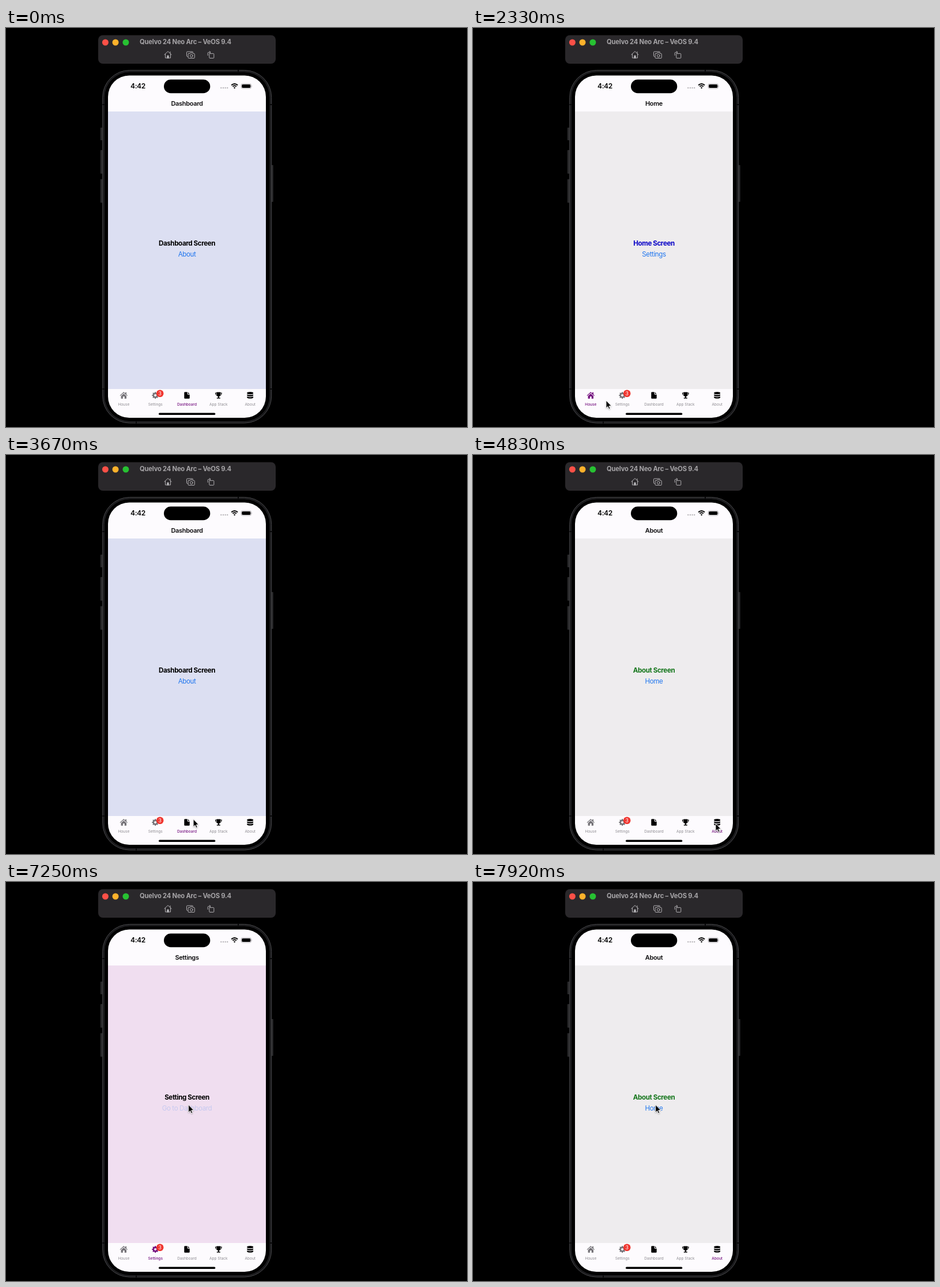
Recreate the animation shown at these times as an HTML page. Size 800 by 693 pixels, loop 8000 ms.

```html
<!DOCTYPE html>
<html lang="en">
<head>
<meta charset="utf-8">
<title>Tab navigation</title>
<style>
  html, body { margin: 0; width: 100%; height: 100%; overflow: hidden; background: #000; }
  svg { display: block; width: 800px; height: 693px; }
  text { font-family: Inter, "Open Sans", sans-serif; }
  .mid { text-anchor: middle; }
  .head { font-size: 11px; font-weight: 600; letter-spacing: -.03em; fill: #0b0a0c; }
  .name { font-size: 11.6px; font-weight: 700; letter-spacing: -.034em; }
  .link { font-size: 11.6px; letter-spacing: -.034em; fill: #2076ee; }
  .label { font-size: 6.5px; }
  .tool { fill: none; stroke: #b3b1b4; stroke-width: 1; stroke-linejoin: round; stroke-linecap: round; }
</style>
</head>
<body>
<svg viewBox="0 0 800 693" xmlns="http://www.w3.org/2000/svg">
  <defs>
    <clipPath id="glass"><rect x="177" y="82.5" width="274" height="594.5" rx="37"/></clipPath>
    <filter id="soft" x="-50%" y="-50%" width="200%" height="200%">
      <feDropShadow dx="0" dy="1" stdDeviation=".8" flood-opacity=".35"/>
    </filter>
  </defs>
  <rect width="800" height="693"/>

  <!-- window bar -->
  <rect x="160" y="12.5" width="308" height="49.5" rx="8" fill="#2a282b"/>
  <circle cx="172.4" cy="25" r="5.5" fill="#fb5047"/>
  <circle cx="190" cy="25" r="5.5" fill="#fdb12b"/>
  <circle cx="207.9" cy="25" r="5.5" fill="#27c132"/>
  <text x="232" y="28.4" font-size="11.2" font-weight="700" letter-spacing="-.2" fill="#a6a4a7">Quelvo 24 Neo Arc – VeOS 9.4</text>
  <g class="tool">
    <path d="M274.8 46.4 281 40.6l6.2 5.8M276.5 45.2V52h9v-6.8M285 43.8v-2.6"/>
    <path d="M279.8 52v-4h2.4v4z" fill="#b3b1b4"/>
    <path d="M315.3 49.5h-.6q-1.2 0-1.2-1.2v-6q0-1.2 1.2-1.2h8.6q1.2 0 1.2 1.2v.2"/>
    <path d="M317.2 44.3h2l.9-1.3h3.4l.9 1.3h1.8q1.1 0 1.1 1.1v6q0 1.1-1.1 1.1h-9q-1.1 0-1.1-1.1v-6q0-1.1 1.1-1.1z"/>
    <circle cx="321.8" cy="48.2" r="2.3"/>
    <rect x="352.8" y="44.4" width="8" height="8" rx="1"/>
    <path d="M350.2 47.5v-3.4q0-2 2-2h2.6M353.2 40.4l1.8 1.7-1.8 1.7"/>
  </g>

  <!-- phone body -->
  <g fill="#29292b">
    <rect x="163.8" y="173" width="4" height="22" rx="1"/>
    <rect x="163.8" y="212" width="4" height="41" rx="1"/>
    <rect x="163.8" y="262.5" width="4" height="41" rx="1"/>
    <rect x="460" y="238" width="3.8" height="64" rx="1"/>
  </g>
  <rect x="167.7" y="73.4" width="293" height="612.7" rx="47" fill="#161618" stroke="#4b4b4e"/>
  <rect x="170.4" y="76" width="287.6" height="607.5" rx="44.5" fill="#000" stroke="#2d2d30" stroke-width=".9"/>
  <path d="M167.5 133h3M458 133h3M167.5 627h3M458 627h3M403 73v3M226 683.5v3" stroke="#050506" stroke-width="2"/>

  <g clip-path="url(#glass)">
    <rect x="177" y="82" width="274" height="596" fill="#fdfbfe"/>
    <rect id="back" x="177" y="145" width="274" height="482"/>
  </g>

  <!-- status bar -->
  <text x="216" y="105.2" font-size="12" font-weight="600" letter-spacing="-.36">4:42</text>
  <rect x="274" y="89.5" width="80.3" height="23.8" rx="11.9"/>
  <g fill="#b9b7bb">
    <circle cx="373.3" cy="104" r="1.2"/><circle cx="377" cy="104" r="1.2"/>
    <circle cx="380.6" cy="104" r="1.2"/><circle cx="384.2" cy="104" r="1.2"/>
  </g>
  <g fill="none" stroke="#000" stroke-width="1.9">
    <path d="M391.1 99.3q5.5-4.6 11 0M393.3 101.6q3.3-2.7 6.6 0"/>
  </g>
  <path d="M394.8 103.4q1.8-1.4 3.6 0l-1.8 2z"/>
  <rect x="408" y="96.8" width="17.6" height="8.4" rx="2.7" fill="none" stroke="#a5a3a7" stroke-width=".8"/>
  <rect x="409.2" y="98" width="15.2" height="6" rx="1.7"/>
  <path d="M426.5 99.4q1.4 1.6 0 3.2z" fill="#a5a3a7"/>

  <!-- page text -->
  <text id="head" class="mid head" x="314" y="135"/>
  <text id="name" class="mid name" x="314" y="378"/>
  <text id="link" class="mid link" x="314" y="397.2"/>

  <g id="tabs"></g>
  <circle cx="267.2" cy="634.8" r="6.3" fill="#f03630"/>
  <text class="mid" x="267.2" y="637.9" font-size="8.6" fill="#fff">3</text>
  <rect x="265" y="668.6" width="98.3" height="3.3" rx="1.65"/>

  <path id="cursor" d="M0 0V13.2L3 10.4 5 15 7.1 14.1 5.1 9.6H9.2Z"
        stroke="#fff" stroke-width=".9" stroke-linejoin="round" filter="url(#soft)"/>
</svg>
<script>
const LOOP = 8000, STEP = 1000 / 12;
const PURPLE = '#74107f', GREY = '#8d8b90', DARK = '#757378';
const $ = id => document.getElementById(id);

const gear = () => {
  const pts = [];
  for (let i = 0; i < 32; i++) {
    const r = i % 4 < 2 ? 6.1 : 4.6, a = (i - .5) * Math.PI / 16;
    pts.push((r * Math.cos(a)).toFixed(2) + ' ' + (r * Math.sin(a)).toFixed(2));
  }
  return `M${pts.join('L')}ZM2.1 0A2.1 2.1 0 1 0-2.1 0 2.1 2.1 0 1 0 2.1 0Z`;
};
const disc = y => `M-5.4 ${y}q5.4 2.3 10.8 0v1.7q0 1.8-5.4 1.8t-5.4-1.8z`;

// label, icon path, whether the icon takes the tint
const TABS = [
  ['House', 'M-6.7.2 0-5.9 2.8-3.3V-5.2H4.7V-1.6L6.7.2 5.9 1.1 0-4.2-5.9 1.1ZM-4.7 1.2 0-3 4.7 1.2V5.7H1.4V2H-1.4V5.7H-4.7Z', true],
  ['Settings', gear(), true],
  ['Dashboard', 'M-3.5-5.8H.6V-2.4Q.6-1.3 1.7-1.3H4.7V4.5Q4.7 5.8 3.4 5.8H-3.4Q-4.7 5.8-4.7 4.5V-4.6Q-4.7-5.8-3.5-5.8ZM1.7-5.6 4.5-2.4H1.7Z', false],
  ['App Stack', 'M-3.4-5.6H3.4V-4.4H5.9Q6-.5 2.3.9 1.6 2 .9 2.3V3.9H2.2Q3.2 4 3.2 5.6H-3.2Q-3.2 4-2.2 3.9H-.9V2.3Q-1.6 2-2.3.9-6-.5-5.9-4.4H-3.4ZM-4.8-3.3Q-4.5-1.4-2.9-.6L-3.3-3.3ZM4.8-3.3H3.3L2.9-.6Q4.5-1.4 4.8-3.3Z', false],
  ['About', 'M-5.4-4.2Q-5.4-5.9 0-5.9T5.4-4.2V-3.4Q5.4-1.8 0-1.8T-5.4-3.4Z' + disc(-1.6) + disc(2), false]
];
// header, title, title colour, link, background
const PAGES = [
  ['Home', 'Home Screen', '#0700c6', 'Settings', '#eeecee'],
  ['Settings', 'Setting Screen', '#000', 'Go to Dashboard', '#f0def0'],
  ['Dashboard', 'Dashboard Screen', '#000', 'About', '#dcdff2'],
  ['App Stack', 'Home Screen', '#0700c6', 'Settings', '#fdfbfe'],
  ['About', 'About Screen', '#13751a', 'Home', '#eeecee']
];
const VISITS = [[0, 2], [2000, 0], [2830, 1], [3170, 2], [4000, 3], [4750, 4], [5750, 1], [7420, 2], [7830, 4]];
const PRESSES = [[6700, 7340], [7580, 7740]];
const SHOW = 1000;
const TRAIL = [
  [1000, 359, 569.5], [1170, 359, 569.5], [1830, 207, 645], [2080, 207, 645], [2330, 231, 647],
  [2580, 231, 647], [2750, 257, 647], [2920, 257, 647], [3250, 322, 634.5], [3420, 323.5, 633.5],
  [3580, 323.5, 633.5], [3660, 325, 632.5], [3920, 369, 638], [4330, 369, 638], [4670, 421, 640],
  [5250, 421, 640], [5670, 260, 646], [5910, 258.3, 643], [6080, 258.3, 643], [6660, 316.7, 387]
];

$('tabs').innerHTML = TABS.map(([label, icon], i) => {
  const x = 204.3 + i * 54.85;
  return `<path d="${icon}" transform="translate(${x} 638)" fill-rule="evenodd"/>
    <text class="mid label" x="${x}" y="656">${label}</text>`;
}).join('');
const icons = [...$('tabs').querySelectorAll('path')];
const labels = [...$('tabs').querySelectorAll('text')];

const clamp = v => Math.max(0, Math.min(1, v));
const ease = v => v * v * (3 - 2 * v);

function spot(t) {
  const i = TRAIL.findIndex(k => k[0] > t);
  if (i < 0) return TRAIL[TRAIL.length - 1].slice(1);
  if (i === 0) return TRAIL[0].slice(1);
  const [t0, x0, y0] = TRAIL[i - 1], [t1, x1, y1] = TRAIL[i];
  const p = ease((t - t0) / (t1 - t0));
  return [x0 + (x1 - x0) * p, y0 + (y1 - y0) * p];
}

let shown = -1;
function openPage(n) {
  if (n === shown) return;
  shown = n;
  const [head, name, tint, link, back] = PAGES[n];
  $('head').textContent = head;
  $('name').textContent = name;
  $('name').setAttribute('fill', tint);
  $('link').textContent = link;
  $('back').setAttribute('fill', back);
  TABS.forEach(([, , tinted], i) => {
    icons[i].setAttribute('fill', tinted ? (i === n ? PURPLE : DARK) : '#000');
    labels[i].setAttribute('fill', i === n ? PURPLE : GREY);
    labels[i].setAttribute('font-weight', i === n ? 500 : 400);
  });
}

function draw(now) {
  const t = Math.floor((now % LOOP + 5) / STEP) * STEP % LOOP;
  openPage(VISITS.filter(v => v[0] <= t).pop()[1]);
  const held = Math.max(...PRESSES.map(([a, b]) => clamp((t - a) / 120) * clamp((b - t) / 80)));
  $('link').setAttribute('opacity', 1 - .8 * held);
  const [x, y] = spot(t);
  $('cursor').setAttribute('transform', `translate(${x.toFixed(2)} ${y.toFixed(2)})`);
  $('cursor').setAttribute('visibility', t >= SHOW - 1 ? 'visible' : 'hidden');
}

const start = performance.now();
function tick() {
  draw(performance.now() - start);
  requestAnimationFrame(tick);
}
tick();
</script>
</body>
</html>
```
